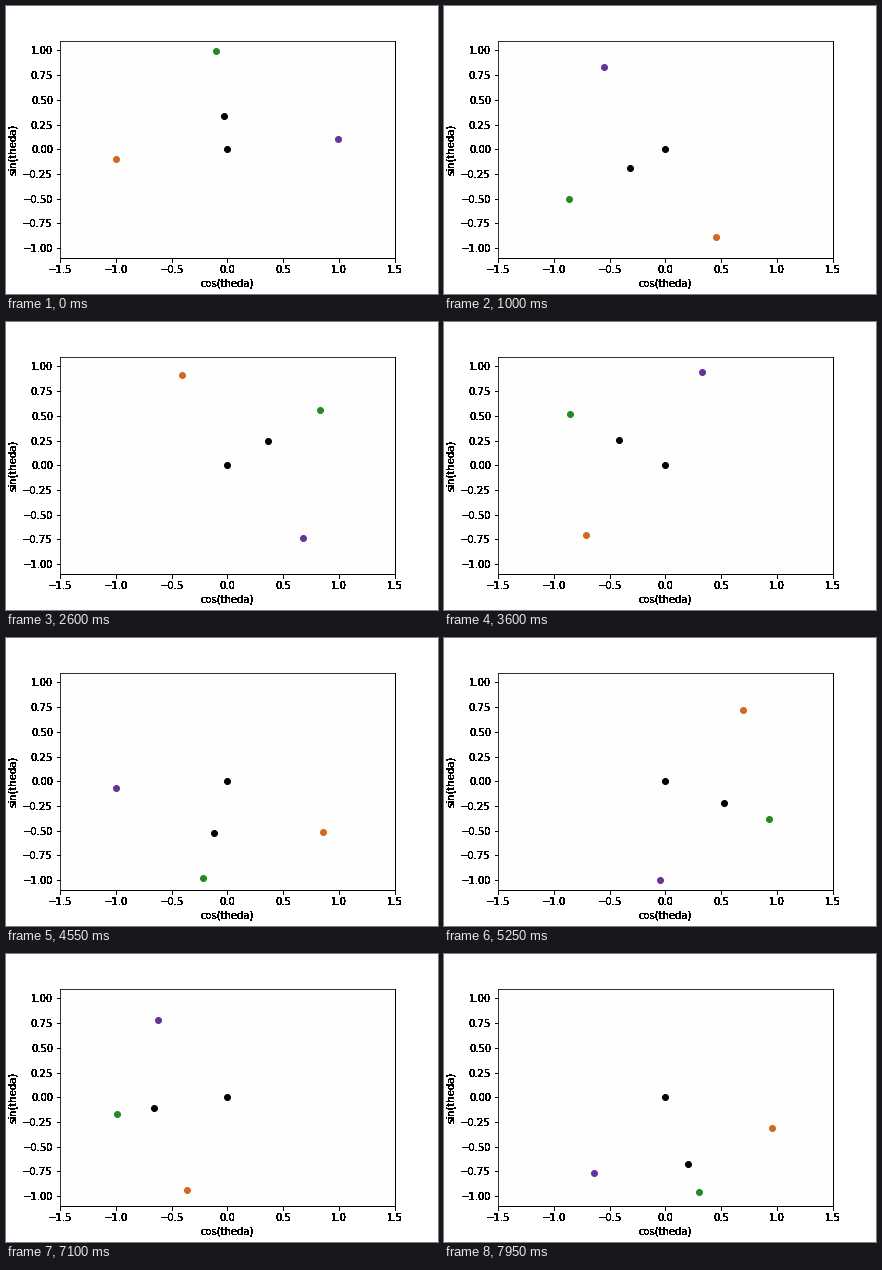
These frames come from a looping animation (432 by 288 pixels, 8000 ms). A matplotlib script:

```python
import math

import matplotlib.pyplot as plt
import numpy as np
from matplotlib.animation import FuncAnimation

FRAMES, INTERVAL = 160, 50
SPEED = 0.1        # radians per step
PULL = 0.00257     # coupling between each pair of dots
COLORS = ["rebeccapurple", "forestgreen", "chocolate"]


def simulate(steps):
    """Coupled oscillators, each one updated in turn."""
    theta = [0.1, math.pi / 2 + 0.1, math.pi + 0.1]
    path = []
    for _ in range(steps):
        path.append(list(theta))
        for i in range(3):
            pull = sum(math.sin(other - theta[i]) for other in theta)
            theta[i] += SPEED + PULL * pull
    return np.array(path)


def harden(img, dpi):
    """Turn soft glyph edges into solid black pixels."""
    out = np.zeros_like(img)
    out[..., 3] = img[..., 3] > 0.125
    return out, 0, 0


plt.rcParams["font.family"] = "DejaVu Sans"
fig = plt.figure(figsize=(6, 4), dpi=72, facecolor="white")
fig.subplots_adjust(left=0.125, right=0.9, bottom=0.125, top=0.88)
ax = fig.add_subplot(facecolor="#fefefe")
ax.set_xlim(-1.5, 1.5)
ax.set_ylim(-1.1, 1.1)
ax.set_xticks(np.arange(-1.5, 1.6, 0.5))
ax.set_yticks(np.arange(-1, 1.1, 0.25))
ax.set_xlabel("cos(theda)")
ax.set_ylabel("sin(theda)")

crisp = [ax.xaxis.label, ax.yaxis.label, ax.spines["right"], ax.spines["bottom"]]
crisp += ax.get_xticklabels() + ax.get_yticklabels()
crisp += list(ax.get_xticklines()) + list(ax.get_yticklines())
for artist in crisp:
    artist.set_agg_filter(harden)

ax.plot(0, 0, "o", color="black")
dots = [ax.plot([], [], "o", color=c)[0] for c in COLORS]
center, = ax.plot([], [], "o", color="black")
angles = simulate(FRAMES)


def update(n):
    x, y = np.cos(angles[n]), np.sin(angles[n])
    for dot, px, py in zip(dots, x, y):
        dot.set_data([px], [py])
    center.set_data([x.mean()], [y.mean()])
    return dots + [center]


anim = FuncAnimation(fig, update, frames=FRAMES, interval=INTERVAL, repeat=True)
plt.show()
```
